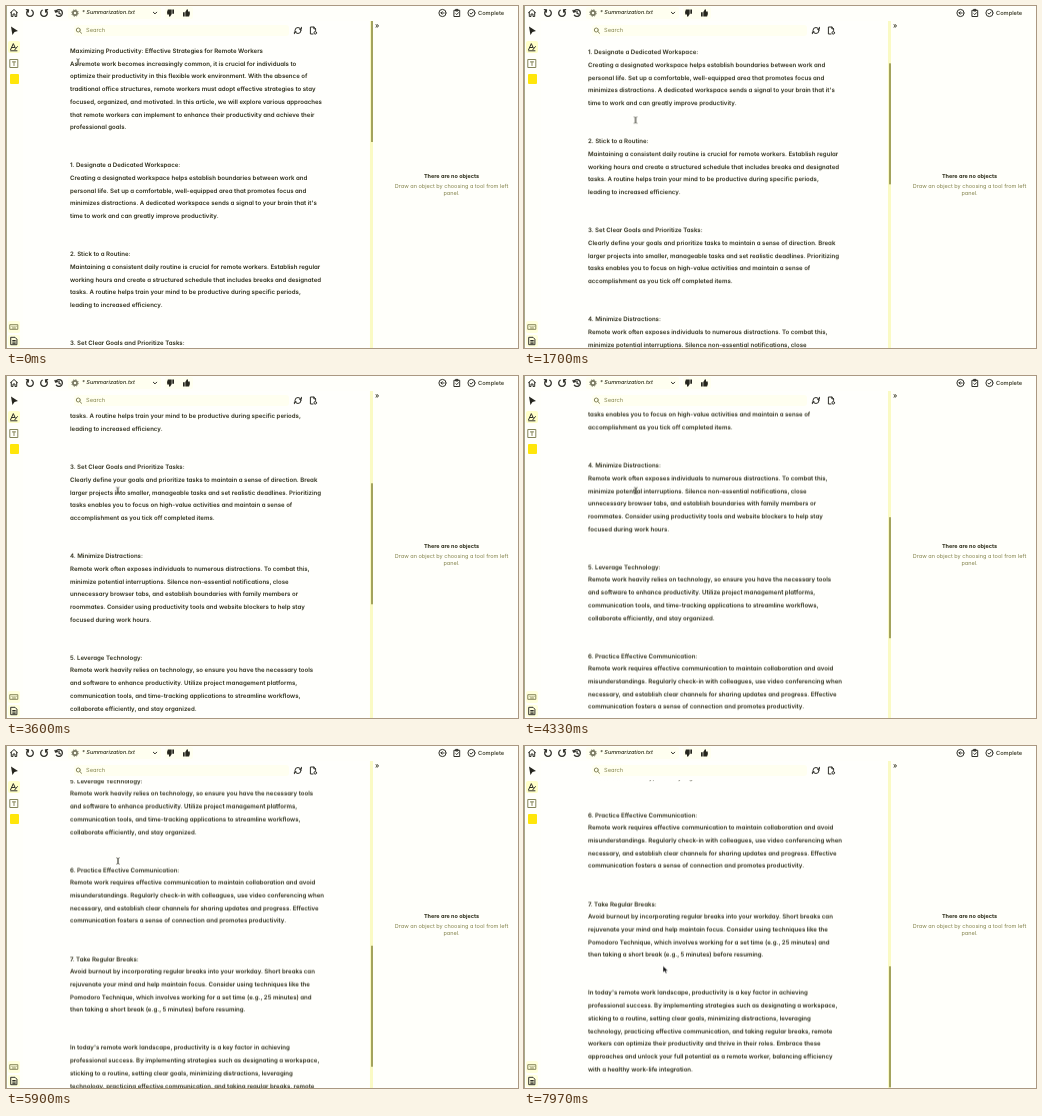
An HTML page that plays this animation: 512 by 342 pixels, repeating every 8000 ms.

```html
<!DOCTYPE html>
<html lang="en">
<head>
<meta charset="utf-8">
<title>Document viewer</title>
<style>
  html, body { margin: 0; width: 100%; height: 100%; overflow: hidden; background: #fffffa; }
  #stage {
    position: relative; width: 512px; height: 342px; overflow: hidden;
    font: 500 5.7px/8px Inter, sans-serif; font-feature-settings: "cv11"; color: #2c2c18;
    text-rendering: geometricPrecision; white-space: pre;
  }
  #stage > * { position: absolute; }
  #view { left: 17px; top: 34px; width: 346px; height: 308px; overflow: hidden; background: #fffffc; }
  #doc {
    position: absolute; left: 47px; top: 5.65px;
    font-size: 6.1px; font-weight: 600; line-height: 12.7px; will-change: transform;
  }
  #thumb { left: 364.5px; top: 15px; width: 2px; height: 121px; background: #a3a35c; }
  #ui, #cursor { left: 0; top: 0; overflow: visible; }
  .line { fill: none; stroke: #30302a; stroke-width: 1; stroke-linecap: round; stroke-linejoin: round; }
  .soft { stroke: #85855a; }
  .bold { stroke-width: 1.3; }
  .empty { left: 380px; width: 131px; text-align: center; }
  .hint { font-size: 5.55px; line-height: 7px; font-weight: 400; color: #85854f; }
</style>
</head>
<body>
<div id="stage">
  <div id="view"><div id="doc"></div></div>
  <svg id="ui" width="512" height="342">
    <rect x="17" y="15" width="346" height="19" fill="#fffffc"/>
    <path d="M.5 0V342" stroke="#aaa98a"/>
    <path d="M365.5 15V342" stroke="#fafac4" stroke-width="3"/>
    <g fill="#fffff0">
      <rect x="62" y="1" width="93" height="12" rx="2"/>
      <rect x="159" y="1" width="28" height="12" rx="2"/>
      <rect x="68" y="19" width="215" height="11" rx="3"/>
      <rect x="2" y="35" width="12" height="12" rx="2" fill="#ffffc8"/>
      <rect x="2" y="315" width="12" height="12" rx="2" fill="#ffffdc"/>
      <rect x="2" y="329" width="12" height="12" rx="2" fill="#ffffdc"/>
    </g>
    <rect x="4" y="68" width="9" height="10" rx="1" fill="#ffe60a"/>
    <g id="icons" class="line"></g>
    <g fill="#25251e">
      <path d="M5 20.5 12 25 8.5 26 6.4 29Z"/>
      <path id="thumbIcon" d="M177 6.2h1.7v4.2H177zM179.3 6 181 3.2q1.4-.2 1 2.2h1.7q.7 2.8-.6 5h-3.8z"/>
      <use href="#thumbIcon" transform="rotate(180 172.5 7)"/>
    </g>
    <circle cx="69" cy="7" r="2.1" fill="none" stroke="#77775f" stroke-width="1.7"/>
    <circle cx="69" cy="7" r="3.3" fill="none" stroke="#77775f" stroke-width=".9" stroke-dasharray="1.3 1.29"/>
  </svg>
  <div style="left:76px;top:3.3px;font-size:5.5px;font-style:italic">* Summarization.txt</div>
  <div style="left:472px;top:3.5px">Complete</div>
  <div style="left:80px;top:20.8px;font-weight:400;color:#85854f">Search</div>
  <div style="left:369px;top:16px;font-size:7px">»</div>
  <div class="empty" style="top:167.2px;font-size:5.5px;font-weight:700">There are no objects</div>
  <div class="empty hint" style="top:178.3px">Draw an object by choosing a tool from left
panel.</div>
  <div id="thumb"></div>
  <svg id="cursor" width="1" height="1">
    <path id="beam" d="M-1.7-3.2Q0-3.2 0-2V2Q0 3.2-1.7 3.2M1.7-3.2Q0-3.2 0-2V2Q0 3.2 1.7 3.2" fill="none" stroke="#3b3b30" stroke-width=".7"/>
    <path id="arrow" d="M-1-3.5V3L.6 1.6 1.8 4 3 3.4 1.9 1.2H4Z" fill="#111" stroke="#fff" stroke-width=".5"/>
  </svg>
</div>
<script>
const DURATION = 8000;
const byId = id => document.getElementById(id);

byId('doc').textContent = `Maximizing Productivity: Effective Strategies for Remote Workers
As remote work becomes increasingly common, it is crucial for individuals to
optimize their productivity in this flexible work environment. With the absence of
traditional office structures, remote workers must adopt effective strategies to stay
focused, organized, and motivated. In this article, we will explore various approaches
that remote workers can implement to enhance their productivity and achieve their
professional goals.


1. Designate a Dedicated Workspace:
Creating a designated workspace helps establish boundaries between work and
personal life. Set up a comfortable, well-equipped area that promotes focus and
minimizes distractions. A dedicated workspace sends a signal to your brain that it's
time to work and can greatly improve productivity.


2. Stick to a Routine:
Maintaining a consistent daily routine is crucial for remote workers. Establish regular
working hours and create a structured schedule that includes breaks and designated
tasks. A routine helps train your mind to be productive during specific periods,
leading to increased efficiency.


3. Set Clear Goals and Prioritize Tasks:
Clearly define your goals and prioritize tasks to maintain a sense of direction. Break
larger projects into smaller, manageable tasks and set realistic deadlines. Prioritizing
tasks enables you to focus on high-value activities and maintain a sense of
accomplishment as you tick off completed items.


4. Minimize Distractions:
Remote work often exposes individuals to numerous distractions. To combat this,
minimize potential interruptions. Silence non-essential notifications, close
unnecessary browser tabs, and establish boundaries with family members or
roommates. Consider using productivity tools and website blockers to help stay
focused during work hours.


5. Leverage Technology:
Remote work heavily relies on technology, so ensure you have the necessary tools
and software to enhance productivity. Utilize project management platforms,
communication tools, and time-tracking applications to streamline workflows,
collaborate efficiently, and stay organized.


6. Practice Effective Communication:
Remote work requires effective communication to maintain collaboration and avoid
misunderstandings. Regularly check-in with colleagues, use video conferencing when
necessary, and establish clear channels for sharing updates and progress. Effective
communication fosters a sense of connection and promotes productivity.


7. Take Regular Breaks:
Avoid burnout by incorporating regular breaks into your workday. Short breaks can
rejuvenate your mind and help maintain focus. Consider using techniques like the
Pomodoro Technique, which involves working for a set time (e.g., 25 minutes) and
then taking a short break (e.g., 5 minutes) before resuming.


In today's remote work landscape, productivity is a key factor in achieving
professional success. By implementing strategies such as designating a workspace,
sticking to a routine, setting clear goals, minimizing distractions, leveraging
technology, practicing effective communication, and taking regular breaks, remote
workers can optimize their productivity and thrive in their roles. Embrace these
approaches and unlock your full potential as a remote worker, balancing efficiency
with a healthy work-life integration.`;

// Outline icons: centre x, centre y, path around that centre, optional style
const icons = [
  [8, 7, 'M-3.5-.3 0-3.5 3.5-.3M-2.7-.8V3.5H-1V1H1V3.5H2.7V-.8'],
  [24, 7, 'M-1.8-2.7A3.3 3.3 0 1 0 1.8-2.7M-3.6-3.3-1.5-3-1.8-.9', 'bold'],
  [38, 7, 'M1.8-2.7A3.3 3.3 0 1 1-1.8-2.7M3.6-3.3 1.5-3 1.8-.9', 'bold'],
  [53, 7, 'M-3.3-1A3.4 3.4 0 1 1-2.6 2.2M-4-2.5-3.3-.8-1.6-1.3M0-1.7V.2L1.5 1', 'bold'],
  [149, 7, 'M-1.7-.8 0 .9 1.7-.8'],
  [436.5, 7, 'M3.6 0A3.6 3.6 0 1 1-3.6 0A3.6 3.6 0 1 1 3.6 0M1.6 0H-1.6L-.3-1.3M-1.6 0-.3 1.3'],
  [451, 7, 'M-2.7-2.7H2.7V3.5H-2.7ZM-1-3.6H1V-2H-1ZM-1.2.7-.2 1.6 1.4-.3'],
  [465.5, 7, 'M3.6 0A3.6 3.6 0 1 1-3.6 0A3.6 3.6 0 1 1 3.6 0M-1.5.1-.4 1.2 1.6-1'],
  [73, 24.5, 'M1.3-.5A2 2 0 1 1-2.7-.5A2 2 0 1 1 1.3-.5M.8 1 2.6 2.8', 'soft'],
  [292, 24.5, 'M3 0A3 3 0 1 1-3 0A3 3 0 1 1 3 0M3.4-3.2V-1.2H1.6M-3.6 3.2V1.4H-1.8'],
  [307, 24.5, 'M0 3.5H-2.6V-3.5H.8L2.6-1.7V0M.8-3.5V-1.7H2.6M3.6 2.3A1.3 1.3 0 1 1 1 2.3A1.3 1.3 0 1 1 3.6 2.3'],
  [8, 41, 'M-3.4 2.7-.7-3.4 1.3 1M-2.3.5H.5M.8 2.8 3.4-.4M-3.4 3.8H3'],
  [8, 57.5, 'M-3.8-4H3.8V4H-3.8ZM-1.6-1.6H1.6M0-1.6V2', 'soft'],
  [8, 321, 'M-3.8-2.3H3.8V2.3H-3.8ZM-2-.6H-1.9M0-.6H.1M2-.6H2.1M-1.5 1H1.5', 'soft'],
  [8, 335, 'M-2.9-3.7H1L2.9-1.8V3.7H-2.9ZM-1.3-.5H1.3M-1.3 1H1.3M-1.3 2.3H1.3']
];
byId('icons').innerHTML = icons
  .map(([x, y, d, style = '']) => `<path class="${style}" transform="translate(${x} ${y})" d="${d}"/>`).join('');

// Each track row is [time in ms, ...values]
const scroll = [[0, 0], [250, 0], [970, 64], [2330, 155], [3600, 246],
  [4330, 336.5], [5900, 492.5], [6600, 547.5], [DURATION, 547.5]];
const pointer = [[0, 72, 56], [120, 74, 58], [600, 112, 117.5], [970, 112, 117.5],
  [1400, 111.5, 114], [5900, 112, 115], [6700, 112, 115], [7500, 140, 223.5], [DURATION, 140, 223.5]];
const beamShown = [[0, 1], [700, 0], [1300, 1], [6900, 0], [DURATION, 0]];

function play(id, rows, style, easing = 'linear') {
  const frames = rows.map(([time, ...values]) => ({ offset: time / DURATION, easing, ...style(...values) }));
  byId(id).animate(frames, { duration: DURATION, iterations: Infinity }).startTime = 0;
}

const move = (x, y) => ({ transform: `translate(${x}px, ${y}px)` });
play('doc', scroll, y => move(0, -y));
play('thumb', scroll, y => move(0, y * 0.375));
play('cursor', pointer, move);
play('beam', beamShown, on => ({ opacity: on }), 'step-end');
play('arrow', beamShown, on => ({ opacity: 1 - on }), 'step-end');
</script>
</body>
</html>
```
